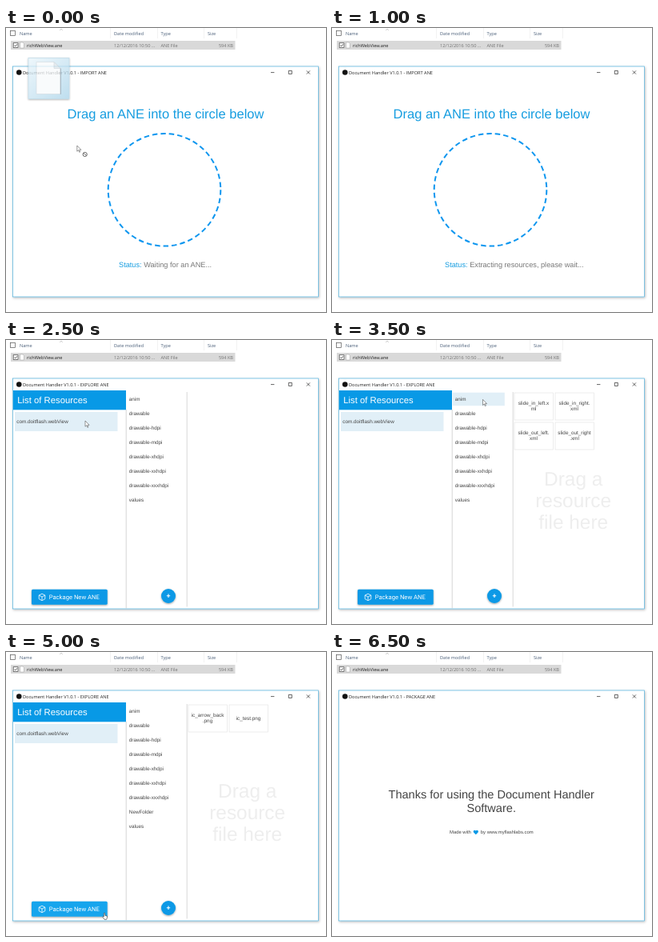
Write an HTML page that moves like this. It is 400 px wide and 355 px high and loops after 8500 ms.

```html
<!DOCTYPE html>
<html lang="en">
<head>
<meta charset="utf-8">
<title>Importing a package</title>
<style>
html, body { margin: 0; width: 100%; height: 100%; overflow: hidden; background: #fff; }
svg { display: block; width: 400px; height: 355px; }
text { font-family: "Open Sans", "Noto Sans", sans-serif; text-rendering: geometricPrecision; white-space: pre; }
.app { font-family: "Liberation Sans", Arial, sans-serif; }
.btn { font-family: Roboto, sans-serif; }
</style>
</head>
<body>
<svg id="stage" viewBox="0 0 400 355" xmlns="http://www.w3.org/2000/svg"></svg>
<script>
const BLUE = '#0899e6', PALE = '#e1eff7', DARK = '#444';
const APP = 'Document Handler';
const LOOP = 8500;
const starts = [0, 500, 1000, 1500, 2000, 2500, 3000, 3500, 4000, 4500, 5000, 6000, 6500];

// y is the vertical middle of the capitals
const text = (x, y, s, size = 5.6, fill = '#222', attrs = '') =>
  `<text x="${x}" y="${y + size * 0.36}" font-size="${size}" fill="${fill}" ${attrs}>${s}</text>`;
const app = (x, y, s, size = 6.35, fill = DARK, attrs = '') => text(x, y, s, size, fill, `class="app" ${attrs}`);
const mid = (x, y, s, size, fill) => app(x, y, s, size, fill, 'text-anchor="middle"');
const rect = (x, y, w, h, fill, stroke = 'none', attrs = '') =>
  `<rect x="${x}" y="${y}" width="${w}" height="${h}" fill="${fill}" stroke="${stroke}" stroke-width=".7" ${attrs}/>`;
const line = (d, stroke = '#333', width = 0.7) =>
  `<path d="${d}" fill="none" stroke="${stroke}" stroke-width="${width}"/>`;
const shape = (d, fill) => `<path d="${d}" fill="${fill}"/>`;
const dot = (x, y, r, fill) => `<circle cx="${x}" cy="${y}" r="${r}" fill="${fill}"/>`;
const at = (x, y, s, attrs = '') => `<g transform="translate(${x} ${y})" ${attrs}>${s}</g>`;

const arrow = (x, y) => at(x, y,
  '<path d="M0 0V7.2L1.7 5.7L2.9 8.3L3.9 7.9L2.8 5.3H5.1Z" fill="#fff" stroke="#555" stroke-width=".6"/>');
const hand = (x, y) => at(x, y,
  '<path d="M1.2 0Q2 0 2 1V3.3L4.6 4V6.3L3.8 8.3H1.2L-1 5.2L-.4 4.4L.5 5V1Q.5 0 1.2 0Z" fill="#fff" stroke="#333" stroke-width=".6"/>');
const page = (x, y, k) => at(x, y,
  `<path d="M0 0H3.6L5 1.5V7H0Z" fill="#fff" stroke="#999" stroke-width="${0.5 / k}"/>`, `transform-origin="0 0" style="scale:${k}"`);
const pc = (x, y) => rect(x, y, 7, 4.6, '#1da5e8', '#3b7ea8') + line(`M${x + 1.5} ${y + 6}h4`, '#3b7ea8');

const defs = `<defs>
  <linearGradient id="ghost" x2="1" y2="1"><stop stop-color="#e9f5fb"/><stop offset="1" stop-color="#a9d3e9"/></linearGradient>
  <filter id="drop" x="-20%" y="-20%" width="140%" height="150%"><feDropShadow dx="0" dy=".9" stdDeviation=".9" flood-opacity=".4"/></filter>
  <filter id="soft" x="-5%" y="-5%" width="110%" height="110%"><feDropShadow dx=".8" dy="1.2" stdDeviation="1.5" flood-opacity=".28"/></filter>
</defs>`;

function explorer() {
  const head = '#4c607a', grey = '#747474';
  return [130, 189, 247, 288].map(x => line(`M${x}.5 0V13`, '#ececec')).join('') +
    rect(5.5, 3.5, 6, 6, '#fff', '#555') +
    text(17, 7, 'Name', 5.6, head) + text(135, 7, 'Date modified', 5.6, head) +
    text(193.5, 7, 'Type', 5.6, head) + text(252, 7, 'Size', 5.6, head) +
    line('M67.3 2.8l1.7-1.5l1.7 1.5', '#888', 0.5) +
    rect(6, 16, 280.5, 11, '#d9d9d9') +
    rect(9.2, 18.7, 5.8, 5.8, '#fff', '#444') + line('M10.4 21.6l1.3 1.4l2.3-2.8', '#222') +
    page(17.5, 18, 1) + text(26, 21.7, 'richWebView.ane') +
    text(135, 21.7, '12/12/2016 10:50 ...', 5.6, grey) + text(193.5, 21.7, 'ANE File', 5.6, grey) +
    text(284, 21.7, '594 KB', 5.6, grey, 'text-anchor="end"');
}

function appWindow(mode, active = true) {
  const ink = active ? '#222' : '#999';
  return rect(8.4, 48, 382, 288, '#fff', active ? '#4fb0dc' : '#c4c4c4', 'filter="url(#soft)"') +
    dot(16.3, 55.5, 3.3, '#111') + text(21, 55.6, `${APP} V1.0.1 - ${mode} ANE`, 5.6, ink) +
    line('M331 55.6h4.4M353.3 53.4h4v4h-4zM375.8 53.4l4.2 4.2m0-4.2l-4.2 4.2', ink);
}

function ghost(x, y, opacity) {
  return at(x, y,
    rect(0, 0, 51, 51, 'url(#ghost)', '#a9cfe2', 'filter="url(#drop)"') +
    '<path d="M10 5H32L40 13V45H10Z" fill="#f7fafc" stroke="#c3ced5" stroke-width=".6"/>' +
    '<path d="M32 5V13H40Z" fill="#dfe7ec" stroke="#b5c0c8" stroke-width=".5"/>' +
    line('M40.3 13V45.4', '#6f8797', 0.8), `opacity="${opacity}"`);
}

function importView(step) {
  const over = step === 1;
  const status = step < 2 ? 'Waiting for an ANE...' : 'Extracting resources, please wait...';
  return appWindow('IMPORT') +
    mid(199.5, 107, 'Drag an ANE into the circle below', 16.5, '#169de0') +
    `<circle cx="198" cy="202.3" r="70.3" fill="${over ? '#e5f5fe' : '#fff'}" stroke="#0d96ef" stroke-width="2" stroke-dasharray="6.5 4.016"/>` +
    app(141, 295.7, `<tspan fill="#169de0">Status:</tspan> ${status}`, 9.2, '#777') +
    (step === 0 ? ghost(28, 37.5, 0.75) + arrow(88.8, 147) +
      `<circle cx="98.7" cy="158" r="2.6" fill="#fff" stroke="#555" stroke-width=".9"/>` + line('M97 156.2l3.5 3.5', '#555', 0.9) : '') +
    (over ? ghost(153.5, 126.5, 0.9) + arrow(213, 236) +
      rect(218.5, 242.3, 26.5, 9.5, '#fff', '#888') + line('M221 247h4.6M223.3 244.7v4.6', '#223', 1.2) +
      text(228, 247.2, 'Copy', 5.7, '#2d3c9c') : '');
}

function packageButton(hover) {
  return rect(32, 311.7, 94.7, 19, hover ? '#18a5ed' : BLUE, 'none', 'rx="1.5" filter="url(#drop)"') +
    line('M45 317.2l3.8 1.9v4.6l-3.8 2l-3.8-2v-4.6zM41.2 319.1l3.8 2l3.8-2M45 321.1v4.6', '#fff', 0.8) +
    text(53.7, 321.3, 'Package New ANE', 7.65, '#fff', 'class="btn"');
}

function tile(i, a, b) {
  const x = 228 + i % 2 * 51, y = 66 + (i >> 1) * 37, cx = x + 24;
  return rect(x, y, 48.5, 34, '#fff', '#e4e4e4') +
    (b ? mid(cx, y + 13.2, a) + mid(cx, y + 20.2, b) : mid(cx, y + 17, a));
}

function exploreView(step) {
  const last = step === 10;
  let s = appWindow('EXPLORE') + rect(9, 63, 141, 24.3, BLUE) +
    app(14.3, 75.2, 'List of Resources', 11.3, '#fff') + line('M150.2 87V335.5', '#c4c4c4');
  if (step > 3) s += rect(11, 90, 128.5, 24, PALE);
  s += app(13.3, 102, 'com.doitflash.webView') + packageButton(last);
  if (step > 4) {
    const dirs = ['anim', 'drawable', ...['h', 'm', 'xh', 'xxh', 'xxxh'].map(d => `drawable-${d}dpi`)];
    if (last) dirs.push('NewFolder');
    dirs.push('values');
    if (step > 5 && !last) s += rect(150.8, 65.7, 65, 16.5, PALE);
    s += dirs.map((d, i) => app(153.8, 74 + 18 * i, d)).join('') + line('M226.2 65V333.5', '#c8c8c8') +
      `<circle cx="203" cy="320" r="9" fill="${BLUE}" filter="url(#drop)"/>` + line('M200.8 319.8h4.4M203 317.6v4.4', '#fff', 1.1);
  }
  if (step > 6) {
    s += ['Drag a', 'resource', 'file here'].map((t, i) => mid(301.7, 172.8 + 27 * i, t, 24.4, '#eee')).join('');
    const files = step < 9
      ? [['slide_in_left.x', 'ml'], ['slide_in_right.', 'xml'], ['slide_out_left.', 'xml'], ['slide_out_right', '.xml']]
      : [['ic_arrow_back', '.png'], ['ic_test.png']];
    s += files.map((f, i) => tile(i, ...f)).join('');
  }
  const cursor = { 4: [99, 101], 5: [99, 101], 6: [156, 72], 7: [188.5, 74.3], 8: [317.5, 95.5], 9: [360.7, 132.5] }[step];
  return s + (cursor ? arrow(...cursor) : '') + (last ? hand(121.8, 326) : '');
}

function sidebar() {
  const pin = y => line(`M78 ${y - 2}l-3.6 3.6M75.2 ${y - 1.6}l2.6 2.6`, '#888', 0.9);
  return rect(28.5, 113.5, 7, 5, '#6cbbe6', '#7a99aa') + shape('M28.5 118.5l2.5-3l1.7 1.6l1.3-1l1.5 2.4z', '#3b8a55') +
    text(37.7, 116, 'Pictures') + pin(116) +
    dot(30.7, 130, 1.6, '#1b8fe0') + line('M32.2 130v-5.5l2.4 2', '#1b8fe0', 1) +
    text(37.7, 127.7, 'Music') + pin(128) +
    rect(28.5, 136.7, 6.5, 5.5, '#5178ae', '#333') + line('M29.2 136.5v6M34.4 136.5v6', '#222', 1) +
    text(37.7, 139.5, 'Videos') + pin(139.5) +
    dot(28, 201.5, 3.2, '#0f6cc4') + text(34, 201.5, 'FarStash') +
    rect(20.5, 211, 60.5, 11.5, '#d9d9d9') + pc(24.5, 214) + text(34, 217, 'This PC') +
    pc(24.5, 229.6) + text(34, 232.5, 'Network') +
    rect(81, 110.5, 7.5, 126, '#f0f0f0') + rect(81.3, 143.5, 6.9, 61.5, '#cdcdcd') +
    line('M83 116.5l1.8-1.8l1.8 1.8M83 231l1.8 1.8l1.8-1.8', '#555', 0.9);
}

function saveDialog() {
  const navy = '#1e395b';
  const chevron = (x, y) => line(`M${x - 1.7} ${y - 0.8}l1.7 1.7l1.7-1.7`, '#555');
  const button = (x, label, edge, w) => `<rect x="${x}" y="275" width="42" height="11" fill="#e1e1e1" stroke="${edge}" stroke-width="${w}"/>` +
    text(x + 21, 280.4, label, 5.6, '#222', 'text-anchor="middle"');
  return rect(12.3, 65.2, 366.5, 227.8, '#fff', '#4fa8d2', 'filter="url(#soft)"') +
    dot(17.3, 71.2, 3, '#111') + text(24.5, 71.2, 'Select location for download by app:/resManager.swf', 5.65) +
    line('M367.7 68.5l4.2 4.2m0-4.2l-4.2 4.2') +
    line('M24.5 86.3h-6m2.3-2.3l-2.3 2.3l2.3 2.3M35 86.3h6m-2.3-2.3l2.3 2.3l-2.3 2.3', '#c2c2c2', 0.9) + chevron(48.3, 86.3) +
    line('M58 89.5v-6m-2.4 2.4l2.4-2.4l2.4 2.4', '#333', 0.9) +
    rect(63.5, 80, 205, 13, '#fff', '#d9d9d9') + pc(66.5, 83.3) +
    line('M78.5 84.6l1.7 1.7l-1.7 1.7M108.8 84.6l1.7 1.7l-1.7 1.7') +
    text(83.7, 86.4, 'This PC') + text(114.2, 86.4, 'Desktop') + chevron(253.2, 86.4) +
    line('M258.3 80v13', '#d9d9d9') + line('M265.2 85a2.3 2.3 0 1 1-1.7-1.2l-.9-1.2m.9 1.2l-1.2.9') +
    rect(274.3, 80, 98, 13, '#fff', '#d9d9d9') + text(278, 86.4, 'Search Desktop', 5.6, '#777') +
    '<circle cx="366" cy="85.5" r="1.8" fill="none" stroke="#555" stroke-width=".7"/>' + line('M364.7 86.9l-2 2', '#555') +
    rect(12.7, 95.5, 365.7, 14.8, '#f5f6f7') + line('M12.7 110.3h365.7', '#e3e5e8') +
    text(21.3, 102.5, 'Organize', 5.6, navy) + shape('M46.8 101.5h3.6l-1.8 2z', navy) + text(65.3, 102.5, 'New folder', 5.6, navy) +
    rect(333.5, 100, 6, 5, '#cfe3f1', '#8395a4') + shape('M333.8 104.8l2.3-2.6l3.2 2.6z', '#3a76a6') +
    shape('M345 101.5h3.6l-1.8 2z', '#444') +
    dot(366.7, 102.5, 3.9, '#0563ae') + text(366.7, 102.5, '?', 5.8, '#fff', 'text-anchor="middle" font-weight="700"') +
    sidebar() +
    rect(12.7, 236.7, 365.7, 56, '#f0f0f0') + line('M12.7 236.7h365.7', '#dcdcdc') +
    text(71, 246.6, 'File name:', 5.6, '#222', 'text-anchor="end"') + text(71, 259.2, 'Save as type:', 5.6, '#222', 'text-anchor="end"') +
    rect(73.5, 241.2, 302, 10.6, '#fff', '#2c8fd8') + rect(75.5, 242.6, 45.5, 7.8, '#0b79d6') +
    text(76, 246.6, 'richWebView.ane', 5.6, '#fff') + chevron(371, 246.5) +
    rect(73.5, 254, 302, 10, '#e2e2e2', '#b3b3b3') + text(76, 259.1, 'All Files (*.*)') + chevron(371, 259) +
    line('M18 282.5l2.3-2.3l2.3 2.3', '#333', 0.9) + text(27, 281.5, 'Hide Folders') +
    button(279, 'Save', '#0d7bd5', 1.2) + button(327.3, 'Cancel', '#adadad', 0.7) +
    [[0, 0], [-2, 0], [-4, 0], [0, -2], [-2, -2], [0, -4]].map(([x, y]) => rect(376 + x, 290 + y, 1, 1, '#b5b5b5')).join('');
}

function thanksView() {
  return appWindow('PACKAGE') +
    mid(199.2, 178, `Thanks for using the ${APP}`, 14.57) + mid(199.2, 195, 'Software.', 14.57) +
    app(147, 225.3, 'Made with', 5.9) + app(185.8, 225.3, 'by www.myflashlabs.com', 5.9) +
    shape('M179.8 228.3l-2.8-2.9a1.65 1.65 0 0 1 2.8-1.9a1.65 1.65 0 0 1 2.8 1.9z', BLUE);
}

function scene(step) {
  if (step < 3) return importView(step);
  if (step < 11) return exploreView(step);
  return step === 11 ? appWindow('PACKAGE', false) + saveDialog() : thanksView();
}

const stage = document.getElementById('stage');
const origin = performance.now();
let shown = -1;
function draw() {
  const t = (performance.now() - origin) % LOOP;
  const step = starts.filter(s => s <= t).length - 1;
  if (step !== shown) {
    shown = step;
    stage.innerHTML = defs + explorer() + scene(step);
  }
  requestAnimationFrame(draw);
}
draw();
</script>
</body>
</html>
```
